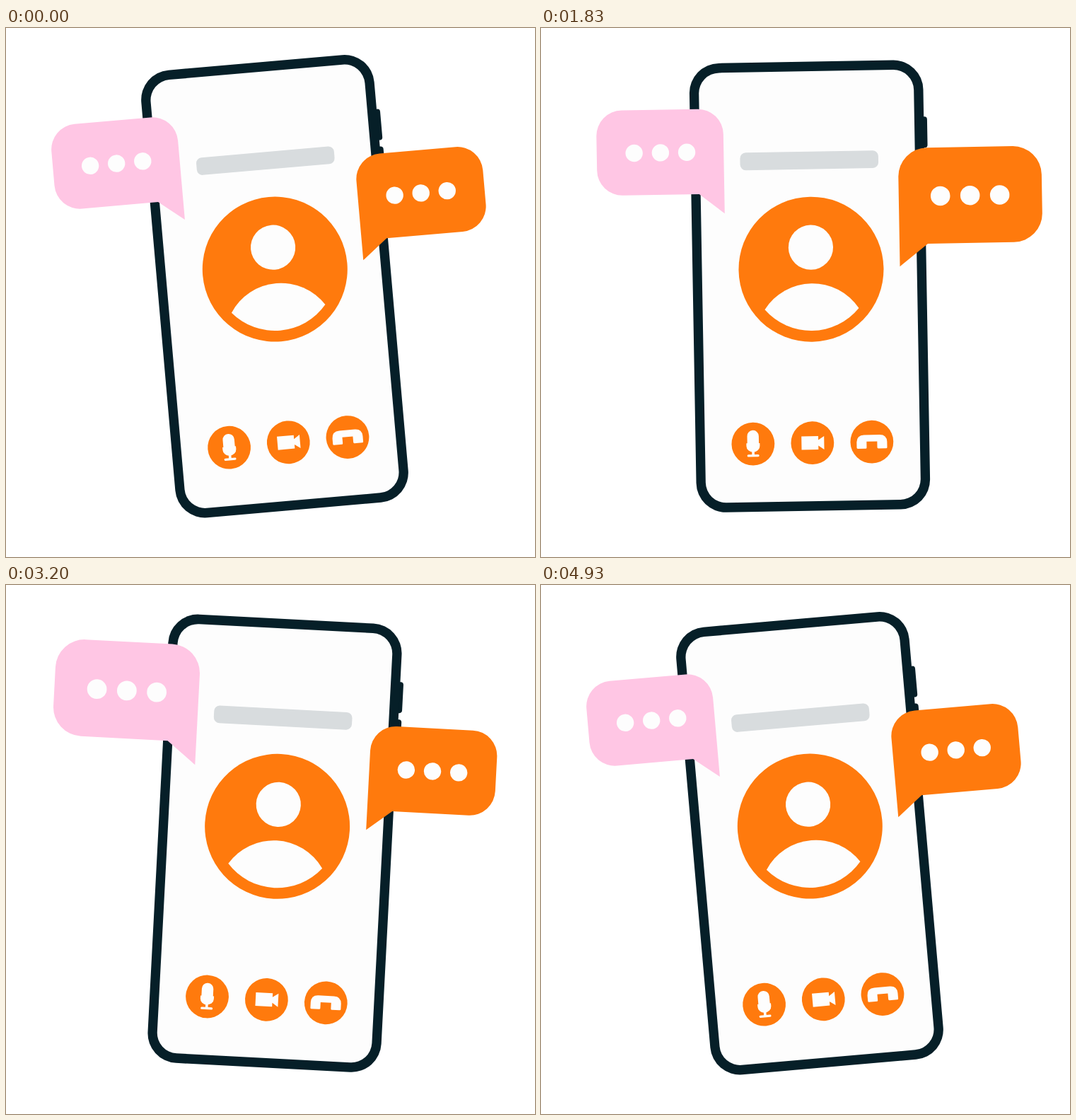
These frames come from a looping animation (748 by 748 pixels, 5010 ms). An HTML page:

```html
<!DOCTYPE html>
<html lang="en">
<head>
<meta charset="utf-8">
<title>Phone call</title>
<style>
  html, body { margin: 0; width: 100%; height: 100%; overflow: hidden; background: #fff; }
  svg { display: block; width: 100%; height: 100%; }
  .dark { fill: #061f28; }
  .white { fill: #fdfdfd; }
  .orange { fill: #ff7a0d; }
  .pink { fill: #ffc6e4; }
  .grey { fill: #d8dcde; }
</style>
</head>
<body>
<svg viewBox="0 0 748 748">
  <defs>
    <!-- Speech bubble with the tip of its tail at the origin -->
    <g id="bubble">
      <path d="M0 0V-112.2A36 36 0 0 0-36-148.2H-143.5A36 36 0 0 0-179.5-112.2V-64A36 36 0 0 0-143.5-28H-35.5Z"/>
      <g class="white">
        <circle cx="-126.6" cy="-87.5" r="12.2"/>
        <circle cx="-89.4" cy="-87.5" r="12.2"/>
        <circle cx="-52.2" cy="-87.5" r="12.2"/>
      </g>
    </g>
    <circle id="button" class="orange" r="30.4"/>
  </defs>

  <g id="phone">
    <g class="dark">
      <rect x="155" y="-237" width="15" height="44" rx="4"/>
      <rect x="155" y="-184" width="15" height="44" rx="4"/>
      <rect x="-165.3" y="-317.5" width="330.6" height="635" rx="42"/>
    </g>
    <rect class="white" x="-152" y="-304" width="304" height="608" rx="29"/>
    <rect class="grey" x="-95.4" y="-190.4" width="195.5" height="24.8" rx="8"/>

    <g transform="translate(2.4 -24)">
      <circle class="orange" r="102.5"/>
      <circle class="white" cy="-31" r="31.6"/>
      <path class="white" d="M-66.5 56A79.4 79.4 0 0 1 66.5 56A87 87 0 0 1-66.5 56Z"/>
    </g>

    <g transform="translate(-84 221.5)">
      <use href="#button"/>
      <g class="white">
        <rect x="-8.2" y="-19.3" width="16.4" height="28" rx="8.2"/>
        <path d="M-9.5-1V3A9.5 8.5 0 0 0 9.5 3V-1Z"/>
        <rect x="-1.8" y="8" width="3.6" height="9"/>
        <rect x="-8.5" y="15" width="17" height="3.2" rx="1.6"/>
      </g>
    </g>
    <g transform="translate(0 221.5)">
      <use href="#button"/>
      <path class="white" d="M-15.5-9.5H8.3V-4L16.5-9.5V9.5L8.3 4V9.5H-15.5Z"/>
    </g>
    <g transform="translate(84 221.5)">
      <use href="#button"/>
      <path class="white" d="M-21.5 8V0Q-21-10-11-10H11Q21-10 21.5 0V8Q21.5 9.5 20 9.5H9Q7.5 9.5 7.5 8V-.5H-7.5V8Q-7.5 9.5-9 9.5H-20Q-21.5 9.5-21.5 8Z"/>
    </g>

    <use id="left" class="pink" href="#bubble"/>
    <use id="right" class="orange" href="#bubble"/>
  </g>
</svg>
<script>
const LOOP = 5010;
const [phone, left, right] = ['phone', 'left', 'right'].map(id => document.getElementById(id));

// cubic-bezier(.4, 0, .2, 1), solved by bisection
function ease(x) {
  if (x <= 0) return 0;
  if (x >= 1) return 1;
  let low = 0, high = 1, u;
  for (let i = 0; i < 24; i++) {
    u = (low + high) / 2;
    const at = 1.2 * u * (1 - u) ** 2 + 0.6 * u * u * (1 - u) + u ** 3;
    if (at < x) low = u; else high = u;
  }
  return u * u * (3 - 2 * u);
}

const move = (t, start, duration) => ease((t - start) / duration);
const pulse = (t, grow, shrink) => 0.138 * (move(t, grow, 500) - move(t, shrink, 500));

// The picture steps twice every 100 ms: at 0 and at 30
function stepped(t) {
  const base = Math.floor(t / 100) * 100;
  return Math.min(base + (t - base >= 30 ? 30 : 0), 4930);
}

function draw(now) {
  const t = stepped(now % LOOP);
  const angle = -5 + 4 * move(t, 297, 1250) + 4 * move(t, 1870, 1060) - 8 * move(t, 3350, 1060);
  const leftScale = 1 + pulse(t, 30, 770) + pulse(t, 2680, 3260);
  const rightScale = 1 + pulse(t, 1487, 2115) + pulse(t, 3900, 4430);
  phone.setAttribute('transform', `translate(380 365.2) rotate(${angle})`);
  left.setAttribute('transform', `translate(-118.4 -105) scale(${leftScale})`);
  right.setAttribute('transform', `translate(128 -25.8) scale(${-rightScale} ${rightScale})`);
}

const begin = performance.now();
function tick() {
  draw(performance.now() - begin);
  requestAnimationFrame(tick);
}
tick();
</script>
</body>
</html>
```
